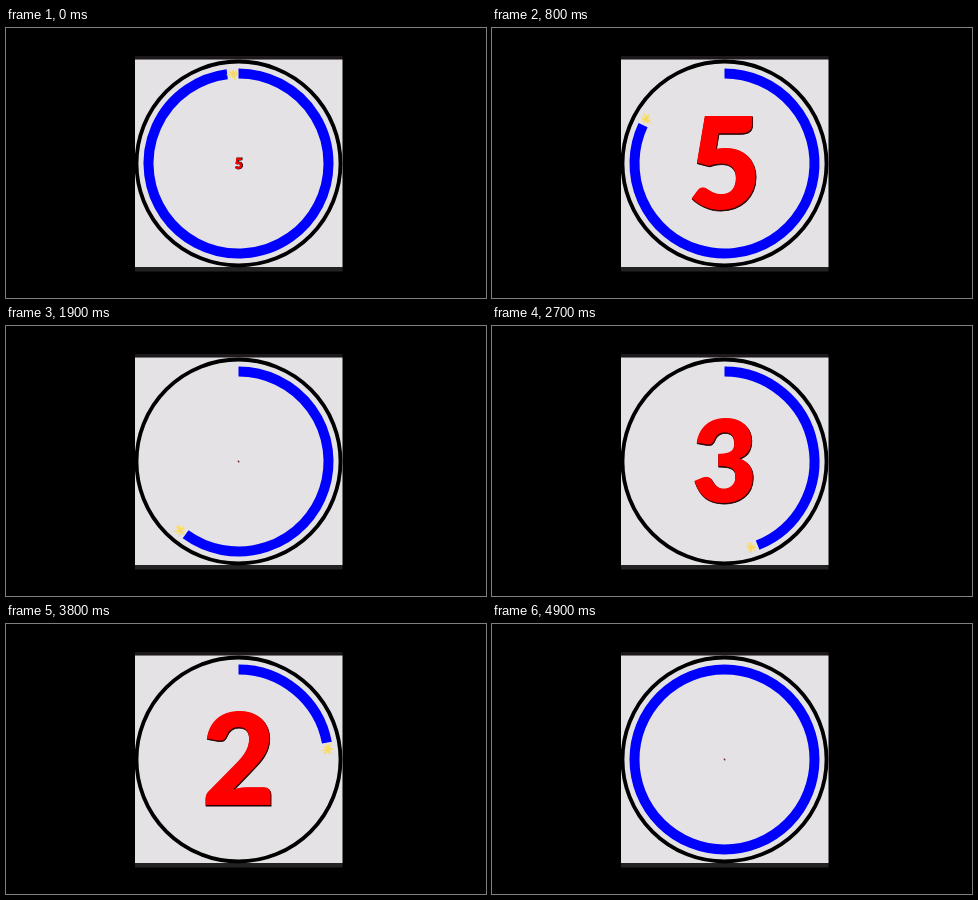
Animation of 480 by 270 pixels, one loop 5 s. Source, as an HTML page:

```html
<!DOCTYPE html>
<html lang="en">
<head>
<meta charset="utf-8">
<title>Countdown</title>
<style>
  html, body { margin: 0; width: 100%; height: 100%; overflow: hidden; background: #000; }
  svg { display: block; width: 100vw; height: 100vh; }
  text { font-family: Lato, "Open Sans", sans-serif; font-weight: 900; text-anchor: middle; }
</style>
</head>
<body>
<svg viewBox="0 0 480 270">
  <rect width="480" height="270" fill="#000"/>
  <rect x="129" y="28" width="207.5" height="3.5" fill="#1c181c"/>
  <rect x="129" y="238.5" width="207.5" height="5" fill="#222"/>
  <rect x="129" y="31.5" width="207.5" height="207.5" fill="#e4e2e5"/>
  <circle cx="232.5" cy="135.5" r="102" fill="none" stroke="#000" stroke-width="3.8"/>
  <path id="arc" fill="none" stroke="#00f" stroke-width="10"/>
  <g id="spark">
    <circle r="4.5" fill="#f6e4a8" opacity=".6"/>
    <path id="rays" fill="none" stroke="#f7d95c" stroke-width="1"/>
  </g>
  <path id="dot" d="M231.9 134.7L233.2 136.4" stroke="#722" stroke-width="1.3"/>
  <text id="shade" fill="#200" stroke="#200"/>
  <text id="digit" fill="#f00"/>
</svg>
<script>
const CX = 232.5, CY = 135.5, R = 90;
const STEP = 100, STEPS = 50, PER_DIGIT = 10;
const FONT_SIZE = 141, CAP = 0.72;
const $ = id => document.getElementById(id);
const set = (el, attrs) => { for (const k in attrs) el.setAttribute(k, attrs[k]); };

function polar(deg, r = R) {
  const a = deg * Math.PI / 180;
  return [CX + r * Math.sin(a), CY - r * Math.cos(a)];
}

function randomFrom(seed) {
  let s = seed * 7919 + 17;
  return () => (s = (s * 16807) % 2147483647) / 2147483647;
}

function drawArc(deg) {
  const [x, y] = polar(deg || 180);
  const top = CY - R;
  const d = deg
    ? `M${CX} ${top}A${R} ${R} 0 ${deg > 180 ? 1 : 0} 1 ${x} ${y}`
    : `M${CX} ${top}A${R} ${R} 0 0 1 ${x} ${y}A${R} ${R} 0 0 1 ${CX} ${top}`;
  set($("arc"), { d });
}

function drawSpark(deg, seed) {
  set($("spark"), { visibility: deg ? "visible" : "hidden" });
  const [x, y] = polar(deg + 4.2);
  set($("spark"), { transform: `translate(${x} ${y})` });
  const rnd = randomFrom(seed + 1);
  rnd();
  let d = "";
  for (let i = 0; i < 11; i++) {
    const a = (i + rnd() * 0.7) * 2 * Math.PI / 11;
    const len = 3.5 + rnd() * 4;
    d += `M0 0L${len * Math.cos(a)} ${len * Math.sin(a)}`;
  }
  set($("rays"), { d });
}

function drawDigit(n, scale) {
  const size = FONT_SIZE * scale;
  const base = CY + size * CAP / 2 + 0.2;
  const show = scale ? "visible" : "hidden";
  set($("dot"), { visibility: scale ? "hidden" : "visible" });
  for (const [id, shift] of [["shade", 0.5], ["digit", 0]]) {
    $(id).textContent = n;
    set($(id), { x: CX + shift, y: base + shift, "font-size": size, visibility: show });
  }
  set($("shade"), { "stroke-width": 0.8 });
}

function draw(ms) {
  const k = Math.floor(ms / STEP) % STEPS + 1;
  const deg = 360 * (STEPS - k) / STEPS;
  drawArc(deg);
  drawSpark(deg, k);
  drawDigit(5 - Math.floor(k / PER_DIGIT), k % PER_DIGIT / PER_DIGIT);
}

function tick() {
  draw(performance.now());
  requestAnimationFrame(tick);
}
tick();
</script>
</body>
</html>
```
